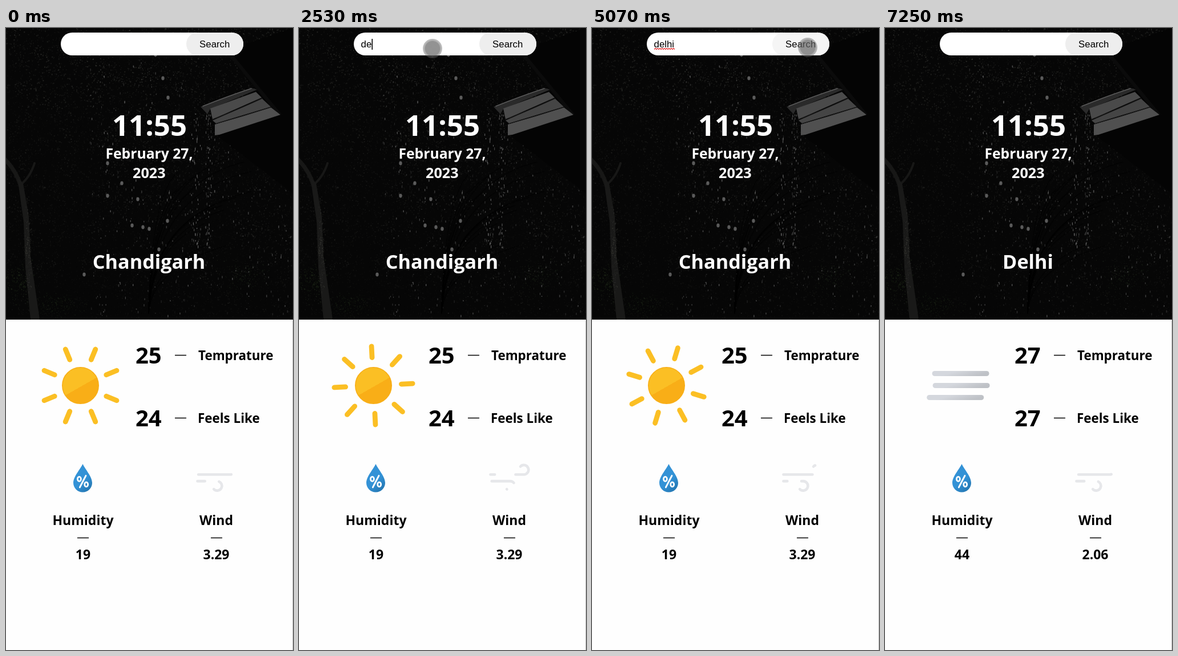
An HTML page with a canvas that plays this animation: 503 by 1090 pixels, repeating every 7320 ms.

```html
<!DOCTYPE html>
<html lang="en">
<head>
<meta charset="utf-8">
<title>Weather</title>
<style>
  html, body { margin: 0; width: 100%; height: 100%; overflow: hidden; background: #fefefe; }
  canvas, svg { position: absolute; left: 0; top: 0; display: block; }
  .ui { font-family: "Open Sans", "Noto Sans", sans-serif; font-weight: 700; }
  .field { font-family: "Liberation Sans", Arial, sans-serif; font-size: 16.8px; }
  .mid { text-anchor: middle; }
  .label { font-size: 22.4px; }
  .num { font-size: 40px; }
  .small { font-size: 23px; }
</style>
</head>
<body>
<canvas id="photo" width="503" height="511"></canvas>
<svg width="503" height="1090" viewBox="0 0 503 1090">
  <defs>
    <linearGradient id="sunFill" gradientUnits="userSpaceOnUse" x1="-16" y1="-28" x2="16" y2="28">
      <stop offset=".53" stop-color="#fbbf24"/><stop offset=".53" stop-color="#f9ae17"/>
    </linearGradient>
    <linearGradient id="fogFill" x1="0" y1="0" x2="1" y2=".3">
      <stop offset=".4" stop-color="#d4d7dd"/><stop offset="1" stop-color="#bec1c6"/>
    </linearGradient>
    <linearGradient id="dropFill" x1=".25" y1=".2" x2=".75" y2="1">
      <stop offset=".5" stop-color="#3392d6"/><stop offset="1" stop-color="#2477b2"/>
    </linearGradient>
    <radialGradient id="touch">
      <stop offset=".74" stop-color="#646464" stop-opacity=".7"/>
      <stop offset=".84" stop-color="#646464" stop-opacity=".5"/>
      <stop offset="1" stop-color="#646464" stop-opacity=".4"/>
    </radialGradient>
  </defs>

  <path d="M502.5 511V1090" stroke="#c4c4c4"/>

  <rect x="96" y="8" width="320" height="40" rx="20" fill="#fff"/>
  <rect id="button" x="316" y="8" width="100" height="40" rx="20" fill="#eee"/>
  <g class="field">
    <text x="365.7" y="34" class="mid">Search</text>
    <text id="query" x="108.6" y="34"></text>
  </g>
  <path id="wavy" fill="none" stroke="#e02020" stroke-width="1.1"/>
  <rect id="caret" y="19" width="1.6" height="19"/>

  <g class="ui mid" fill="#fff">
    <text x="251.5" y="189" font-size="51">11:55</text>
    <text x="251" y="229" font-size="24.7">February 27,</text>
    <text x="250.8" y="263" font-size="25.2">2023</text>
    <text id="city" x="250.5" y="422" font-size="34.2"></text>
  </g>

  <g class="ui">
    <text id="temp" class="num" x="227" y="588"></text>
    <text id="feels" class="num" x="227" y="698"></text>
    <text class="label" x="337" y="582">Temprature</text>
    <text class="label" x="336" y="692">Feels Like</text>
    <g class="small mid">
      <text x="135" y="871">Humidity</text>
      <text x="368.5" y="871">Wind</text>
      <text id="humid" x="135" y="931"></text>
      <text id="wind" x="368.5" y="931"></text>
    </g>
  </g>
  <path d="M296 573.5h20M296 683.5h20M125 893.5h20M359 893.5h20" stroke="#000" stroke-width="1.3"/>

  <g id="sun" transform="translate(130.5 626.5)">
    <circle r="31.7" fill="url(#sunFill)" stroke="#f8af18" stroke-width="1.6"/>
    <g id="rays" stroke="#fbbf24" stroke-width="8.8" stroke-linecap="round"></g>
  </g>
  <g id="fog" fill="url(#fogFill)"></g>

  <path d="M134.5 764C131 772 118 786 118 797a16.5 16.5 0 0 0 33 0C151 786 138 772 134.5 764z" fill="url(#dropFill)"/>
  <g fill="none" stroke="#fff" stroke-width="2.8" stroke-linecap="round">
    <path d="M140 784.5L129.3 805"/>
    <ellipse cx="128.4" cy="790.3" rx="3" ry="4"/>
    <ellipse cx="140.7" cy="799.8" rx="3" ry="4"/>
  </g>

  <g transform="translate(316.1 735.5) scale(1.65)" fill="none" stroke="#e6e7ea" stroke-width="2.8" stroke-linecap="round">
    <path id="gust1" d="M43.64 20a5 5 0 1 1 3.61 8.46h-35.5" stroke-dasharray="35 22"/>
    <path id="gust2" d="M29.14 44a5 5 0 1 0 3.61-8.46h-21" stroke-dasharray="24 15"/>
  </g>

  <circle id="cursor" r="17" fill="url(#touch)"/>
</svg>

<script>
const $ = id => document.getElementById(id);
const LOOP = 7320;
const NS = 'http://www.w3.org/2000/svg';

function add(parent, tag, attrs) {
  const el = document.createElementNS(NS, tag);
  for (const k in attrs) el.setAttribute(k, attrs[k]);
  return parent.appendChild(el);
}

// Dark rainy garden behind the header
function paintPhoto() {
  const c = $('photo').getContext('2d');
  let seed = 11;
  const rnd = (a = 0, b = 1) => {
    seed = (seed * 16807) % 2147483647;
    return a + (b - a) * seed / 2147483647;
  };
  const bump = () => (rnd() + rnd() + rnd()) / 1.5 - 1;
  const poly = (color, ...p) => {
    c.fillStyle = color;
    c.beginPath();
    for (let i = 0; i < p.length; i += 2) c.lineTo(p[i], p[i + 1]);
    c.fill();
  };
  const specks = (n, x, y, rx, ry, rgb, alpha) => {
    for (let i = 0; i < n; i++) {
      c.fillStyle = `rgba(${rgb},${rnd(.1, 1) * alpha})`;
      c.fillRect(x + bump() * rx, y + bump() * ry, rnd(.7, 2), rnd(.7, 2.2));
    }
  };
  const line = (w, color, x, y, a, b, d, e) => {
    c.lineWidth = w;
    c.strokeStyle = color;
    c.beginPath();
    c.moveTo(x, y);
    c.quadraticCurveTo(a, b, d, e);
    c.stroke();
  };

  c.fillStyle = '#060606';
  c.fillRect(0, 0, 503, 511);

  // Leaves: clumped grain, thinner towards the bottom
  for (let i = 0; i < 14000; i++) {
    const x = rnd(0, 503), y = rnd(0, 511);
    const clump = Math.sin(x / 23 + Math.sin(y / 31) * 2) * Math.sin(y / 19 + Math.sin(x / 37) * 2);
    const depth = .75 - y / 1100 + (y < 120 && x > 150 ? .25 : 0);
    c.fillStyle = `rgba(72,73,68,${rnd() * depth * (.42 + .25 * clump)})`;
    c.fillRect(x, y, rnd(1, 2.4), rnd(1, 2.4));
  }
  specks(260, 20, 445, 45, 45, '44,58,34', .5);
  specks(260, 90, 485, 70, 30, '40,52,32', .45);
  specks(240, 415, 435, 60, 45, '44,56,38', .4);

  c.lineCap = 'round';
  for (let i = 0; i < 16; i++) {
    const x = rnd(270, 460), y = rnd(210, 400);
    line(1.5, 'rgba(3,3,3,.6)', 250, 500, 255, y + 40, x, y);
  }
  line(7, '#171716', 25, 275, 18, 250, -4, 228);
  line(4, '#171716', 25, 275, 42, 262, 50, 237);
  poly('#191918', 20, 262, 30, 272, 40, 330, 43, 400, 59, 511, 43, 511, 34, 420, 31, 340);
  specks(260, 39, 385, 10, 125, '80,80,74', .35);

  // Eave with black sky above and wall below
  poly('#040404', 385, 40, 503, 0, 503, 290, 372, 190, 366, 165, 440, 110);
  poly('#0b0b0b', 392, 50, 400, 50, 483, 151, 474, 150);
  poly('#2a2a2a', 341, 138, 430, 105, 440, 108, 358, 142, 353, 151);
  poly('#4a4a4a', 358, 141, 438, 112, 448, 122, 362, 160);
  poly('#454545', 362, 162, 449, 124, 464, 138, 368, 167);
  poly('#505050', 366, 169, 464, 139, 481, 152, 374, 187, 366, 188);
  line(1.2, '#191919', 362, 160, 405, 144, 449, 123);
  line(1.2, '#191919', 367, 168, 415, 155, 464, 139);
  line(1.5, '#5a5a5a', 345, 137, 390, 119, 430, 106);

  // Rain
  for (let i = 0; i < 650; i++) {
    const x = rnd(140, 500), y = rnd(60, 505);
    if (x > 340 && y < 190 + (x - 372) * .75) continue;
    c.fillStyle = `rgba(150,150,150,${rnd(.08, .5)})`;
    c.fillRect(x, y, rnd(.7, 1.8), rnd(1, 4.5));
  }
  for (let i = 0; i < 120; i++) {
    c.fillStyle = `rgba(165,165,165,${rnd(.15, .6)})`;
    c.fillRect(rnd() < .5 ? 355 + bump() * 8 : 333 + bump() * 14, rnd(150, 400), 1.2, rnd(2, 5));
  }
  const drops = [275, 88, 231, 300, 251, 352, 221, 346, 283, 338, 137, 432,
    268, 388, 178, 294, 240, 349, 203, 272, 178, 237, 262, 47, 284, 122];
  c.fillStyle = 'rgba(135,135,135,.65)';
  for (let i = 0; i < drops.length; i += 2) {
    c.beginPath();
    c.ellipse(drops[i], drops[i + 1], 2.7, 3.4, 0, 0, 7);
    c.fill();
  }
}

// Touch pointer: time, x, y
const POINTER = [
  [350, 478, 1092], [430, 430, 980], [500, 398, 880], [610, 330, 520], [730, 261, 169],
  [800, 256, 145], [1150, 234, 36], [3920, 234, 36], [4080, 300, 32], [4250, 378, 34],
  [6280, 378, 34], [6370, 408, 60], [6500, 461, 400], [6650, 420, 805],
  [6720, 385, 955], [6770, 368, 1020]
];
const KEYS = [2350, 2520, 2700, 2870, 3050];
const WORD = 'delhi';
const FOCUS = 1450, SPELL = 3600, PRESS = 5000, CLEAR = 5090, SWAP = 5600;
const BEFORE = { city: 'Chandigarh', temp: 25, feels: 24, humid: 19, wind: '3.29' };
const AFTER = { city: 'Delhi', temp: 27, feels: 27, humid: 44, wind: '2.06' };

const show = (el, on) => el.setAttribute('visibility', on ? 'visible' : 'hidden');
function put(id, text) {
  const el = $(id);
  if (el.textContent !== String(text)) el.textContent = text;
}

for (let i = 0; i < 8; i++)
  add($('rays'), 'path', { d: 'M0 -49V-68.7', transform: `rotate(${22.5 + 45 * i})` });
const bars = [605.5, 626.5, 647.5].map(y =>
  add($('fog'), 'rect', { y: y - 4.5, width: 100, height: 9, rx: 4.5 }));

let wave = 'M109 37.5';
for (let x = 111; x < 147; x += 2) wave += `L${x} ${x % 4 === 3 ? 35.5 : 37.5}`;
$('wavy').setAttribute('d', wave);

// Swing between -1 and 1 at constant speed, lowest at time low
function swing(t, low) {
  const p = (((t - low) / 5000) % 1 + 1) % 1;
  return 1 - 4 * Math.abs(p - .5);
}

function drawPointer(t) {
  const n = POINTER.length;
  show($('cursor'), t >= POINTER[0][0] && t < POINTER[n - 1][0]);
  for (let i = 1; i < n; i++) {
    const [t0, x0, y0] = POINTER[i - 1], [t1, x1, y1] = POINTER[i];
    if (t < t0 || t >= t1) continue;
    const k = (t - t0) / (t1 - t0);
    $('cursor').setAttribute('cx', x0 + (x1 - x0) * k);
    $('cursor').setAttribute('cy', y0 + (y1 - y0) * k);
  }
}

function drawField(t) {
  const typed = KEYS.filter(k => k <= t);
  put('query', t < CLEAR ? WORD.slice(0, typed.length) : '');
  const since = t - (typed.length ? typed[typed.length - 1] : FOCUS);
  show($('caret'), t >= FOCUS && t < PRESS && since % 1000 < 500);
  const width = typed.length && t < CLEAR ? $('query').getComputedTextLength() : 0;
  $('caret').setAttribute('x', 108.8 + width);
  show($('wavy'), t >= SPELL && t < CLEAR);
  $('button').setAttribute('fill', t >= PRESS && t < CLEAR ? '#f5f5f5' : '#eee');
}

function draw(t) {
  const data = t < SWAP ? BEFORE : AFTER;
  for (const id in data) put(id, data[id]);
  show($('sun'), t < SWAP);
  show($('fog'), t >= SWAP);
  $('rays').setAttribute('transform', `rotate(${t * .00776})`);
  [5780, 3840, 6790].forEach((low, i) =>
    bars[i].setAttribute('x', 80.5 + 11.5 * swing(t, low)));
  $('gust1').setAttribute('stroke-dashoffset', -19.1 + t * .0552);
  $('gust2').setAttribute('stroke-dashoffset', -32.6 + t * .0377);
  drawField(t);
  drawPointer(t);
}

paintPhoto();
const start = performance.now();
function tick() {
  draw((performance.now() - start) % LOOP);
  requestAnimationFrame(tick);
}
tick();
</script>
</body>
</html>
```
